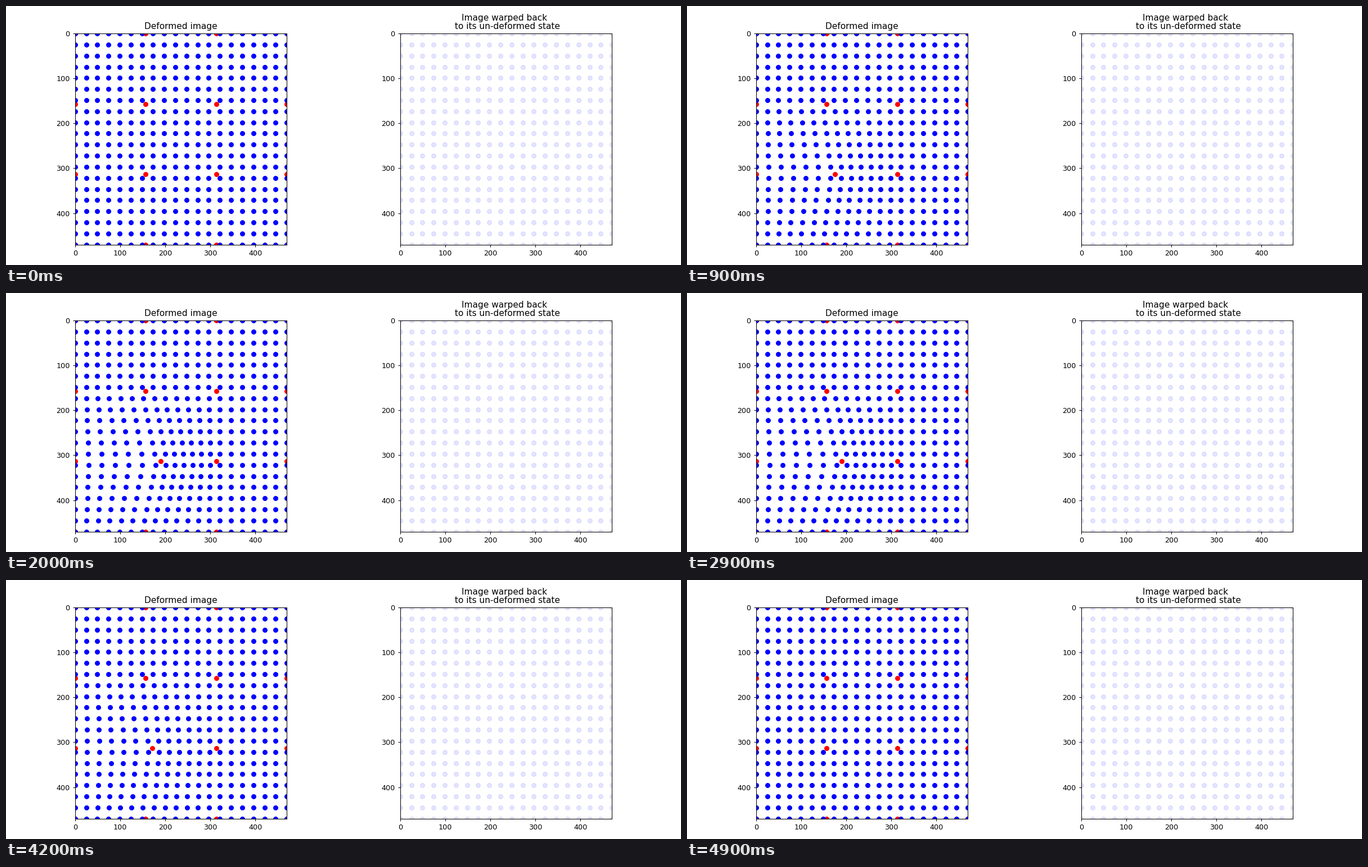
Recreate the animation shown at these times as a matplotlib script. Size 1200 by 462 pixels, loop 5 s.

```python
import numpy as np
import matplotlib.pyplot as plt
from matplotlib.animation import FuncAnimation

W, H, DPI = 1200, 462, 100
SCALE = 12 / 13     # text, lines and markers relative to the defaults
SIZE = 470          # data units along each side
FRAMES = 50
AMPLITUDE = 35      # largest shift of the moving control point
CELL = SIZE / 3

plt.rcParams.update({
    "font.family": "DejaVu Sans",
    "font.size": 10 * SCALE,
    "axes.titlesize": 12 * SCALE,
    "axes.titlepad": 6 * SCALE,
    "axes.linewidth": 0.8 * SCALE,
})
for axis in ("xtick", "ytick"):
    plt.rcParams[axis + ".major.size"] = 3.5 * SCALE
    plt.rcParams[axis + ".major.pad"] = 3.5 * SCALE
    plt.rcParams[axis + ".major.width"] = 0.8 * SCALE

fig = plt.figure(figsize=(W / DPI, H / DPI), dpi=DPI, facecolor="white")


def panel(left, title):
    top, side = 49.1, 376.5
    ax = fig.add_axes([left / W, (H - top - side) / H, side / W, side / H])
    ax.set_xlim(0, SIZE)
    ax.set_ylim(SIZE, 0)
    ax.set_xticks(range(0, SIZE, 100))
    ax.set_yticks(range(0, SIZE, 100))
    ax.set_title(title, linespacing=1.0)
    return ax


def grid(count):
    line = np.linspace(0, SIZE, count)
    x, y = np.meshgrid(line, line)
    return np.column_stack([x.ravel(), y.ravel()])


def weight(points):
    """Bilinear influence of the control point at (1, 2) cells."""
    hats = np.clip(1 - np.abs(points / CELL - [1, 2]), 0, 1)
    return hats.prod(axis=1)


def scatter(ax, points, color, alpha=None):
    return ax.scatter(*points.T, s=(6 * SCALE) ** 2, linewidths=SCALE,
                      color=color, alpha=alpha)


def moved(points, shift):
    return points + np.outer(shift * weight(points), [1, 0])


deformed = panel(122.7, "Deformed image")
restored = panel(700.7, "Image warped back \n to its un-deformed state")

nodes, knots = grid(20), grid(4)
ctrl = scatter(deformed, knots, "red")
dots = scatter(deformed, nodes, "blue")
scatter(restored, nodes, "blue", alpha=0.1)


def update(i):
    shift = AMPLITUDE * np.sin(np.pi * i / (FRAMES - 1))
    ctrl.set_offsets(moved(knots, shift))
    dots.set_offsets(moved(nodes, shift))
    return ctrl, dots


anim = FuncAnimation(fig, update, frames=FRAMES, interval=100,
                     repeat=True, repeat_delay=0, blit=False)
plt.show()
```
